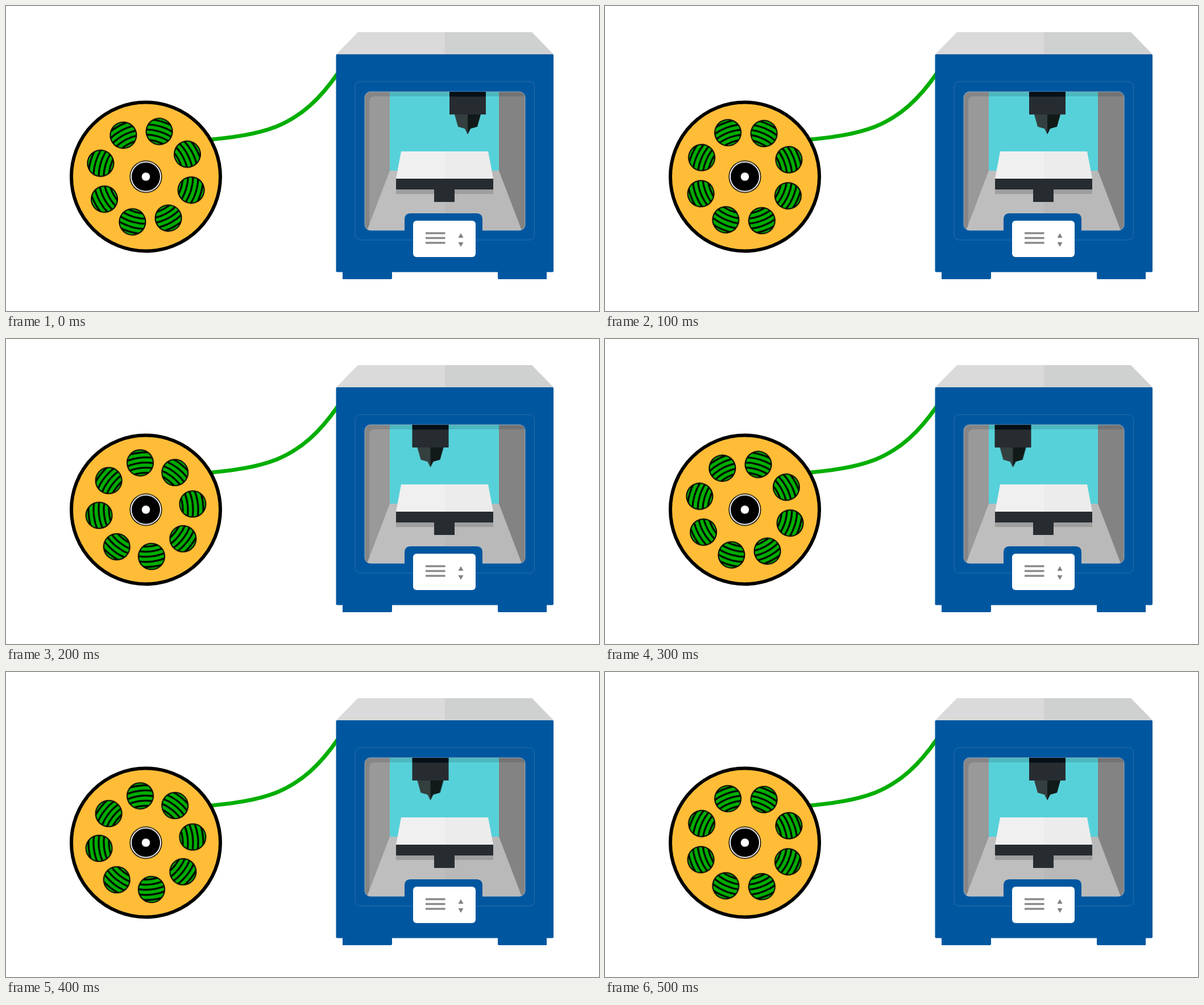
An HTML page for the animation above (600 ms loop, 1043x537 px).

```html
<!DOCTYPE html>
<html lang="en">
<head>
<meta charset="utf-8">
<title>Spool and printer</title>
<style>
  html, body { margin: 0; width: 100%; height: 100%; overflow: hidden; background: #fff; }
  svg { display: block; width: 100vw; height: 100vh; }
</style>
</head>
<body>
<svg viewBox="0 0 1043 537">
  <defs>
    <clipPath id="window"><rect x="631" y="151" width="282" height="244" rx="10"/></clipPath>
    <clipPath id="hole"><circle cy="-83" r="23.5"/></clipPath>
  </defs>

  <path d="M355 235.8C402 231 440 226 475 212.5C520 194 552 164 584 118" fill="none" stroke="#00ae00" stroke-width="7"/>

  <g transform="translate(246 300.5)">
    <circle r="131" fill="#ffbd37" stroke="#000" stroke-width="6"/>
    <g id="holes"></g>
    <circle r="28.5"/>
    <circle r="26" fill="none" stroke="#fff" stroke-width="2"/>
    <circle r="7.3" fill="#fff"/>
  </g>

  <!-- case -->
  <path d="M619 46H772V86H581V85Z" fill="#d9dad9"/>
  <path d="M772 46H925L963 85V86H772Z" fill="#cfd1d0"/>
  <rect x="580.5" y="85" width="382.5" height="383.5" rx="2" fill="#0057a0"/>
  <path d="M592 466H679V479Q679 481 677 481H592ZM865 466H951V481H867Q865 481 865 479Z" fill="#0057a0"/>
  <rect x="614" y="133" width="315.5" height="279" rx="9" fill="none" stroke="#2d6ca6"/>

  <!-- chamber -->
  <g clip-path="url(#window)">
    <rect x="631" y="151" width="45" height="244" fill="#999"/>
    <rect x="867" y="151" width="46" height="244" fill="#838383"/>
    <rect x="675" y="151" width="192" height="140" fill="#57d1d9"/>
    <path d="M675 290H772V395H635Z" fill="#bebebe"/>
    <path d="M772 290H867L907 395H772Z" fill="#b9b9b9"/>
    <path d="M631 151H913V159H649Q639 159 639 169V385L635 395H631Z" fill="#000" opacity=".12"/>
    <rect x="686" y="323" width="171" height="8" fill="#9e9e9e"/>
  </g>
  <rect x="631" y="151" width="282" height="244" rx="10" fill="none" stroke="#a9b8c4" stroke-width=".8"/>

  <!-- bed -->
  <path d="M695 256H772V304H686Z" fill="#f0f0f0"/>
  <path d="M772 256H848L857 304H772Z" fill="#ececec"/>
  <path d="M686 304H857V323H789V345H753V323H686Z" fill="#272c31"/>

  <g id="head">
    <rect y="151" width="64" height="40" fill="#272c31"/>
    <rect y="151" width="64" height="8.5" fill="#071017"/>
    <path d="M9 191H32V226L27 216L15 212.500Z" fill="#343f3f"/>
    <path d="M32 191H55L49 212.500L37 216L32 226Z" fill="#111a19"/>
  </g>

  <!-- control panel -->
  <path d="M701 396V376Q701 365 712 365H827Q838 365 838 376V396Z" fill="#0057a0"/>
  <rect x="716" y="378" width="110" height="64" rx="6" fill="#fff"/>
  <path d="M738 400H772.500M738 408.500H772.500M738 417H772.500" stroke="#8a8a8a" stroke-width="3.500"/>
  <path d="M800 400L804.500 408H795.500ZM800 424L804.500 416H795.500Z" fill="#808080"/>
</svg>
<script>
  const NS = 'http://www.w3.org/2000/svg';
  const holes = document.getElementById('holes');
  const head = document.getElementById('head');

  function add(parent, tag, attrs) {
    const el = document.createElementNS(NS, tag);
    for (const key in attrs) el.setAttribute(key, attrs[key]);
    return parent.appendChild(el);
  }

  // Eight windows show the filament wound round the hub.
  for (let i = 0; i < 8; i++) {
    const hole = add(holes, 'g', { transform: `rotate(${16.5 + i * 45})` });
    const coil = add(hole, 'g', { 'clip-path': 'url(#hole)' });
    add(coil, 'circle', { cy: -83, r: 23.5, fill: '#00ae00' });
    for (let r = 65; r < 106; r += 9) {
      add(coil, 'circle', { r, fill: 'none', stroke: '#000', 'stroke-width': 3.2 });
    }
    add(hole, 'circle', { cy: -83, r: 23, fill: 'none', stroke: '#000', 'stroke-width': 2 });
  }

  // Each pose holds for 100 ms: wheel angle, head position.
  const start = [0, 780], near = [7.4, 746], far = [21.6, 714.5], end = [0, 685.5];
  const poses = [start, near, far, end, far, near];

  function play(el, toTransform) {
    const frames = [...poses, start].map((pose, i) => ({
      offset: i / poses.length,
      transform: toTransform(pose),
      easing: 'step-end'
    }));
    const anim = el.animate(frames, { duration: 600, iterations: Infinity });
    anim.startTime = document.timeline.currentTime || 0;
  }

  play(holes, ([angle]) => `rotate(${angle}deg)`);
  play(head, ([, x]) => `translate(${x}px, 0px)`);
</script>
</body>
</html>
```
